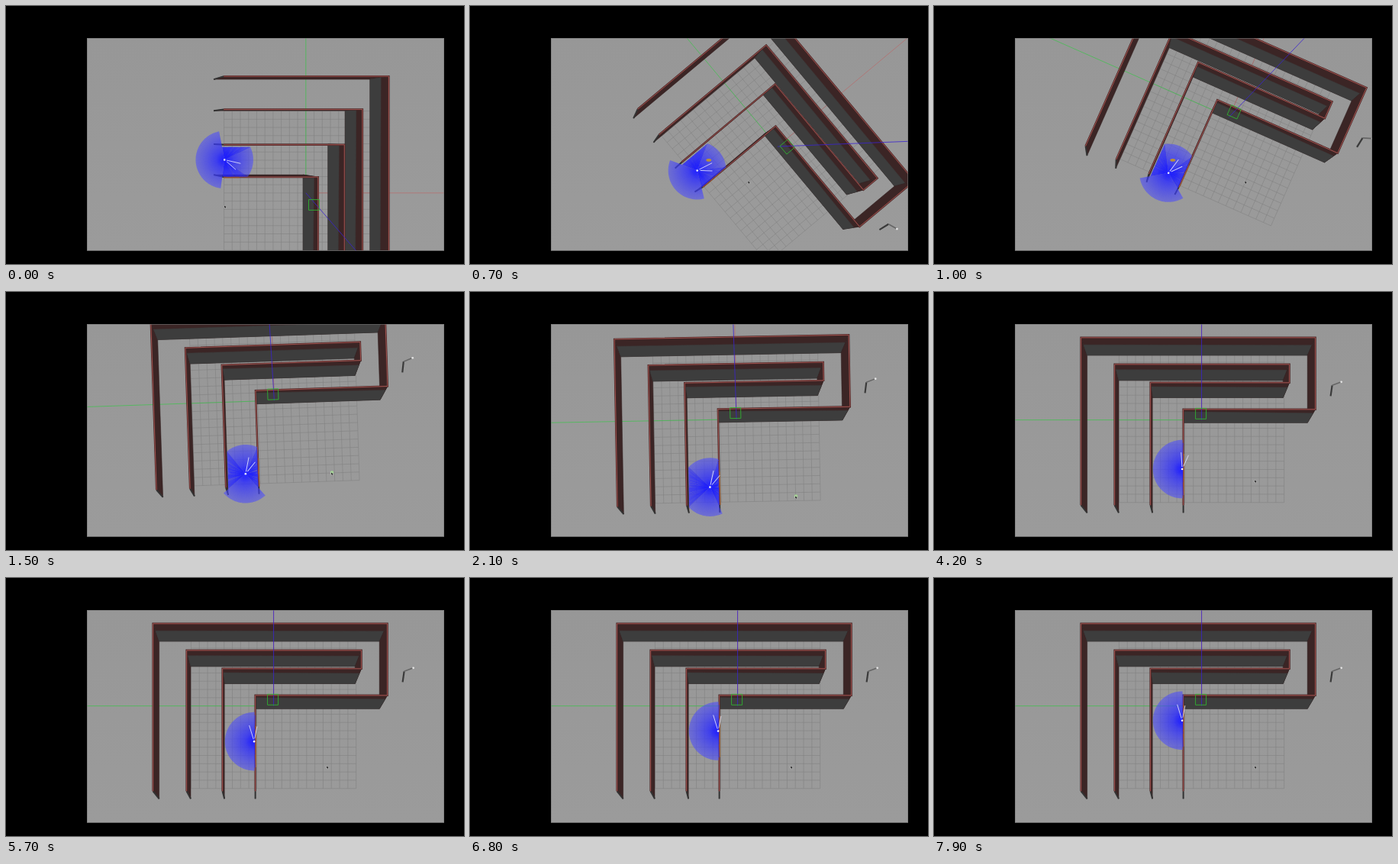
An HTML page that plays this animation: 600 px wide and 338 px high, repeating every 8000 ms.

```html
<!DOCTYPE html>
<html lang="en">
<head>
<meta charset="utf-8">
<title>Corridor robot</title>
<style>
  html, body { margin: 0; width: 100%; height: 100%; overflow: hidden; background: #000; }
  svg { display: block; width: 600px; height: 338px; }
  path { fill: none; }
</style>
</head>
<body>
<svg id="stage" viewBox="0 0 600 338">
  <defs>
    <clipPath id="view"><rect x="106" y="42" width="468" height="278.5"/></clipPath>
    <linearGradient id="floor" x2="0" y2="1">
      <stop stop-color="#979797"/><stop offset="1" stop-color="#9b9b9b"/>
    </linearGradient>
    <radialGradient id="free" gradientUnits="userSpaceOnUse" cx="0" cy="0" r="38">
      <stop stop-color="#1010ff" stop-opacity=".98"/>
      <stop offset=".3" stop-color="#2c2cff" stop-opacity=".78"/>
      <stop offset="1" stop-color="#4c4cff" stop-opacity=".52"/>
    </radialGradient>
    <radialGradient id="hit" gradientUnits="userSpaceOnUse" cx="0" cy="0" r="38">
      <stop stop-color="#0808ff"/>
      <stop offset=".4" stop-color="#2020ff" stop-opacity=".84"/>
      <stop offset="1" stop-color="#3434fa" stop-opacity=".7"/>
    </radialGradient>
  </defs>
  <rect x="106" y="42" width="468" height="278.5" fill="url(#floor)"/>
  <g id="scene" clip-path="url(#view)"></g>
  <rect x="106.5" y="42.5" width="467" height="278" fill="none" stroke="#777" stroke-opacity=".6"/>
</svg>
<script>
const LOOP = 8000, RANGE = 38.3, RAYS = 216, SKIRT = 14.5;
const CELL = 11.5, ORIGIN = [352.5, 149.6];
const LANE_END = 279, SCAN_END = 281, SIDES = [287, 326.5];
// the camera orbits this floor point, seen at this place on screen
const ORBIT = [306, 251], ORBIT_SCREEN = [312.8, 203.4];

const hook = (left, right, top, bottom, back) => [
  [left, LANE_END], [left, top], [right, top], [right, bottom], [back, bottom], [back, LANE_END]
];
const walls = [hook(193, 500, 59.5, 153.5, 327), hook(237, 466, 94.5, 118.5, 284)];

const rad = deg => deg * Math.PI / 180;
const polar = (r, deg) => [r * Math.cos(rad(deg)), r * Math.sin(rad(deg))];
const lerp = (a, b, u) => a + (b - a) * u;
const mix = (a, b, u) => [lerp(a[0], b[0], u), lerp(a[1], b[1], u)];
const ease = (t, from, to) => {
  const u = Math.min(1, Math.max(0, (t - from) / (to - from)));
  return u * u * (3 - 2 * u);
};

const scene = document.getElementById("scene");
function add(tag, attrs, parent = scene) {
  const el = document.createElementNS("http://www.w3.org/2000/svg", tag);
  setAll(el, attrs);
  return parent.appendChild(el);
}
function setAll(el, attrs) {
  for (const name in attrs) el.setAttribute(name, attrs[name]);
}
const stroke = (color, width = 1, opacity = 1, parent = scene) =>
  add("path", { stroke: color, "stroke-width": width, "stroke-opacity": opacity }, parent);
const filled = (fill, edge, width = .5, parent = scene) =>
  add("path", { style: `fill:${fill}`, stroke: edge, "stroke-width": width }, parent);
const draw = (el, d) => el.setAttribute("d", d);
const line = pts => "M" + pts.map(p => p[0].toFixed(2) + " " + p[1].toFixed(2)).join("L");

const grid = stroke("#808080", .8, .7);
const redAxis = stroke("#d04848", .8, .5);
const greenAxis = stroke("#3cc44a", 1, .7);

const wallParts = walls.map(points => ({
  points,
  faces: points.slice(1).map((end, i) => ({
    upper: filled("#3b2525", "#2c1c1c"),
    lower: end[1] === points[i][1] ? filled("#3d3d3d", "#3a3a3a") : null
  })),
  tips: [0, points.length - 1].map(index => ({ index, el: stroke("#333", 2) })),
  rim: stroke("#4a2626", 2.4),
  edge: stroke("#ac5c58", 1, .85)
}));

const glow = stroke("#b9702c", 1, .6);
const bracket = stroke("#3a3a3a", 2.2);
const bracketArm = stroke("#666", 1.6);
const bracketTip = add("circle", { r: 1.4, fill: "#e4e4e4" });

const fan = add("g", {});
const freeRays = filled("url(#free)", "none", 0, fan);
const hitRays = filled("url(#hit)", "none", 0, fan);
const spokes = stroke("#3838ff", .4, .3, fan);
const antenna = stroke("#e6e6ff", 1, .85, fan);
add("circle", { r: 1.3, fill: "#f4f4ff" }, fan);

const beam = stroke("#3a22d0", 1, .8);
const box = stroke("#2fb82f", 1, .85);
const orbitMark = add("ellipse", { cx: ORBIT_SCREEN[0], cy: ORBIT_SCREEN[1] - 1.5, rx: 3.4, ry: 1.8, fill: "#b89038" });
const panMark = add("circle", { r: 2.2, fill: "#a5dc94" });
const cursor = filled("#111", "#ddd", .4);

function castRays(x, y) {
  const out = { free: "", hit: "", spokes: "" };
  const step = 2 * Math.PI / RAYS;
  for (let i = 0; i < RAYS; i++) {
    const a = i * step, dx = Math.cos(a), dy = Math.sin(a);
    let reach = RANGE, kind = "free";
    for (const side of SIDES) {
      const d = (side - x) / dx;
      if (d > 0 && d < reach && y + dy * d < SCAN_END) { reach = d; kind = "hit"; }
    }
    const rim = b => [reach * Math.cos(b), reach * Math.sin(b)];
    out[kind] += line([[0, 0], rim(a - step / 2), rim(a + step / 2)]) + "Z";
    if (i % 2) out.spokes += line([[0, 0], rim(a)]);
  }
  return out;
}

function cameraAt(t) {
  const angle = 90 - 92.1 * ease(t, 0, 1540) + 2.1 * ease(t, 1600, 2600);
  const turn = angle / 90, pan = ease(t, 1050, 1950);
  const scale = 1 - .015 * turn, depth = .06 - .007 * turn;
  const nadir = mix([327, 445], [270, 530], turn);
  const c = scale * Math.cos(rad(angle)), s = scale * Math.sin(rad(angle));
  const cx = ORBIT_SCREEN[0] - 7.2 * pan, cy = ORBIT_SCREEN[1] + 47.9 * pan;
  const top = ([x, y]) => {
    const dx = x - ORBIT[0], dy = y - ORBIT[1];
    return [cx + c * dx - s * dy, cy + s * dx + c * dy];
  };
  return { angle, turn, scale, top, ground: p => top(mix(p, nadir, depth)) };
}

function drawFloor({ ground, angle }) {
  const at = (x, y) => ground([ORIGIN[0] + x * CELL, ORIGIN[1] + y * CELL]);
  let d = "";
  for (let i = -10; i <= 10; i++)
    d += line([at(i, -10), at(i, 10)]) + line([at(-10, i), at(10, i)]);
  draw(grid, d);
  const center = at(0, 0);
  draw(redAxis, line([center, at(0, -40)]));
  draw(greenAxis, line([center, at(-40, 0)]));
  const [bx, by] = polar(260, angle - 90 + 49 * Math.sin(rad(angle)));
  draw(beam, line([center, [center[0] + bx, center[1] + by]]));
}

function drawWalls({ top, ground }) {
  for (const { points, faces, tips, rim, edge } of wallParts) {
    const tops = points.map(top), bases = points.map(ground);
    // the grey skirt keeps a nearly constant height
    const mids = bases.map((b, i) => {
      const height = Math.hypot(b[0] - tops[i][0], b[1] - tops[i][1]);
      return mix(b, tops[i], Math.min(1, SKIRT / height));
    });
    faces.forEach(({ upper, lower }, i) => {
      const quad = upperEdge => line([upperEdge[i], upperEdge[i + 1], bases[i + 1], bases[i]]) + "Z";
      draw(upper, quad(tops));
      if (lower) draw(lower, quad(mids));
    });
    for (const { index, el } of tips) draw(el, line([tops[index], bases[index]]));
    draw(rim, line(tops));
    draw(edge, line(tops));
  }
}

function drawProps({ top, turn }) {
  const bend = top([522, 122]), tip = top([534, 117.5]);
  draw(bracket, line([top([520, 136]), bend]));
  draw(bracketArm, line([bend, tip]));
  setAll(bracketTip, { cx: tip[0], cy: tip[1] });
  const x = 350 + 14 * turn, y = 159, h = 7;
  draw(box, line([[x - h, y - h], [x + h, y - h], [x + h, y + h], [x - h, y + h]].map(top)) + "Z");
}

function drawRobot({ top, angle, scale }, t) {
  const x = 304 + 21.5 * ease(t, 0, 4200);
  const y = 278 - .0116 * t + 2.5 * Math.sin(Math.PI * t / LOOP);
  const heading = -77 - 30 * ease(t, 2600, 5600);
  draw(glow, line([top([328, y - 20]), top([328, Math.min(LANE_END, y + 34)])]));
  const [sx, sy] = top([x, y]);
  setAll(fan, { transform: `translate(${sx} ${sy}) rotate(${angle}) scale(${scale})` });
  const rays = castRays(x, y);
  draw(freeRays, rays.free);
  draw(hitRays, rays.hit);
  draw(spokes, rays.spokes);
  draw(antenna, line([polar(3, heading), polar(22, heading)]) +
    line([polar(4, heading + 28), polar(20, heading + 28)]));
}

function drawPointer(t) {
  const back = ease(t, 3300, 4000);
  const x = 287 + 140 * ease(t, 0, 1300) - 6 * back;
  const y = 263 - 32 * ease(t, 0, 700) + 45 * ease(t, 1200, 2400) - 28 * back;
  draw(cursor, `M${x - 1} ${y - 2}l3 2.6l-1.3 .3l.6 1.5l-.9 .2l-.5-1.4l-.9 .6Z`);
  setAll(panMark, { cx: x, cy: y - 1.5, opacity: t > 1200 && t < 3300 ? .9 : 0 });
  setAll(orbitMark, { opacity: t > 100 && t < 1100 ? 1 : 0 });
}

function render(t) {
  const camera = cameraAt(t);
  drawFloor(camera);
  drawWalls(camera);
  drawProps(camera);
  drawRobot(camera, t);
  drawPointer(t);
}

function frame(now) {
  render(now % LOOP);
  requestAnimationFrame(frame);
}
render(0);
requestAnimationFrame(frame);
</script>
</body>
</html>
```
